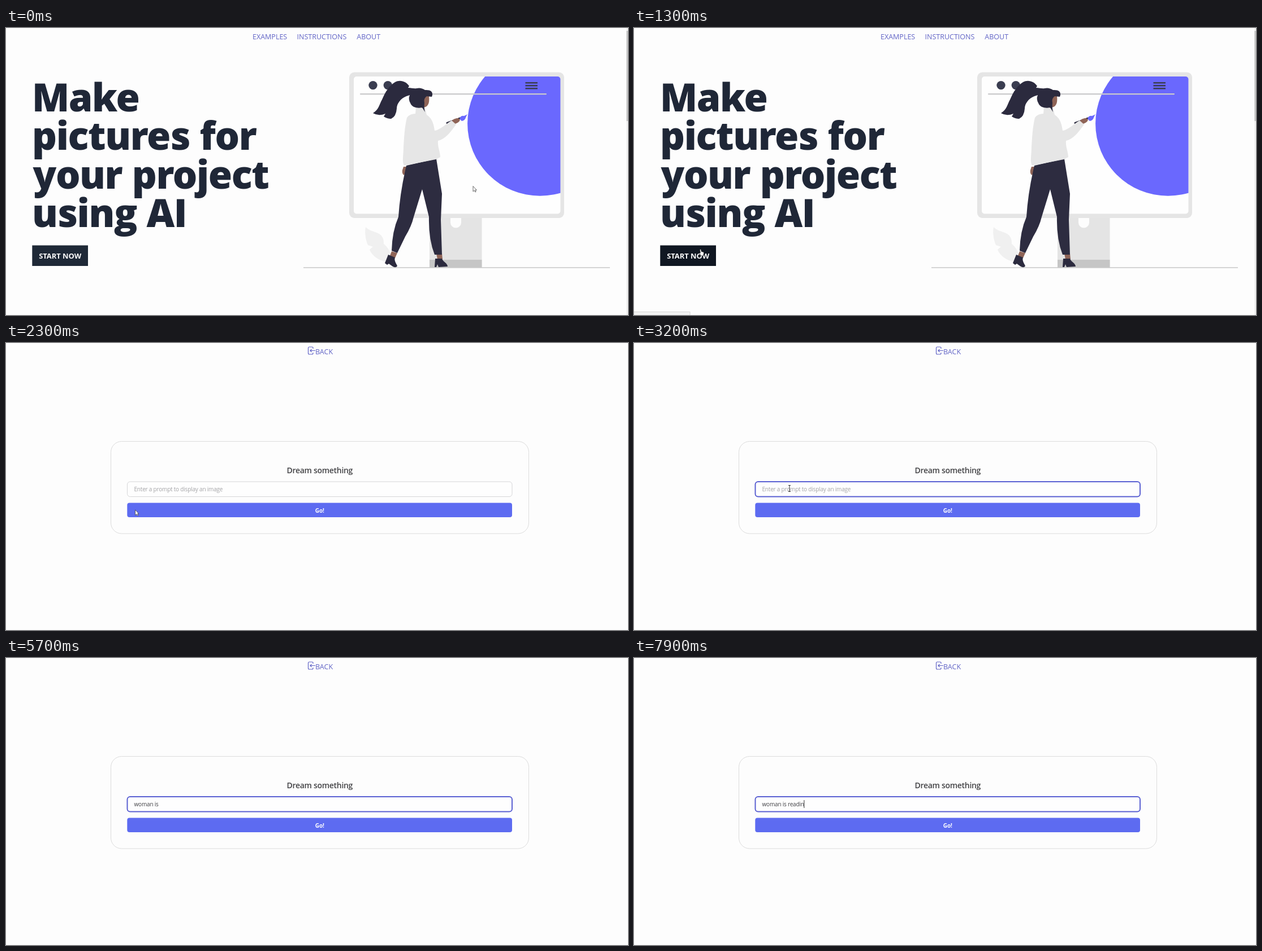
Write an HTML page that moves like this. It is 1100x509 px and loops after 8000 ms.

```html
<!DOCTYPE html>
<html lang="en">
<head>
<meta charset="utf-8">
<title>Picture maker</title>
<style>
html, body { margin: 0; width: 100%; height: 100%; overflow: hidden; background: #fdfdfd; }
svg { display: block; width: 1100px; height: 509px; }
text { font-family: "Open Sans", "Noto Sans", sans-serif; white-space: pre; }
.title { font-size: 68.5px; font-weight: 800; letter-spacing: -1.4px; word-spacing: 1px; fill: #1f2737; }
.nav { font-size: 12.5px; fill: #6164c6; }
.start { font-size: 12.9px; font-weight: 700; fill: #fbfbfb; }
.ask { font-size: 14px; font-weight: 600; letter-spacing: -.3px; fill: #434346; }
.field { font-size: 10px; letter-spacing: -.2px; }
.go { font-size: 10px; font-weight: 700; fill: #fff; }
.status { font-size: 7.5px; fill: #555; }
.mid { text-anchor: middle; }
.dark { fill: #2d2c40; }
.hair { fill: #2b2a3e; }
.skin { fill: #8f6457; }
.blue { fill: #6a68fe; }
</style>
</head>
<body>
<svg viewBox="0 0 1100 509">
  <defs>
    <clipPath id="screen"><rect x="615" y="86" width="365.5" height="243" rx="5"/></clipPath>
  </defs>
  <rect width="1100" height="509" fill="#fdfdfd"/>

  <g id="home">
    <g class="nav">
      <text x="436" y="20">EXAMPLES</text>
      <text x="514.5" y="20">INSTRUCTIONS</text>
      <text x="620.3" y="20">ABOUT</text>
    </g>
    <g class="title">
      <text x="46" y="148">Make</text>
      <text x="46" y="216.3">pictures for</text>
      <text x="47.5" y="284.6">your project</text>
      <text x="46" y="353">using AI</text>
    </g>
    <rect id="start" x="46.3" y="385.5" width="98.7" height="36.5"/>
    <text class="start mid" x="95.7" y="409.3">START NOW</text>

    <!-- leaf, monitor and stand -->
    <path fill="#f0f0f0" d="M636 353C641 359 652 361 660 365Q669 371 668 383Q678 390 684 410L674 415C660 413 647 404 643 393L649 388L640 385C636 376 634 363 636 353Z"/>
    <rect x="749" y="335" width="92.5" height="90" fill="#e4e4e4"/>
    <rect x="749" y="411" width="92.5" height="14" fill="#c6c6c6"/>
    <path fill="#fdfdfd" d="M786 337H805V345A9.5 9.5 0 0 1 786 345Z"/>
    <rect x="607" y="78.5" width="380" height="258.5" rx="9" fill="#e5e5e5"/>
    <rect x="615" y="86" width="365.5" height="243.5" rx="5" fill="#fefefe"/>
    <circle class="blue" cx="944.3" cy="169.6" r="128.2" clip-path="url(#screen)"/>
    <rect x="626" y="116" width="330" height="2.3" rx="1" fill="#c9c9cb"/>
    <g fill="#3a3d50">
      <circle cx="649" cy="101.6" r="7.7"/>
      <circle cx="675.3" cy="101.6" r="7.7"/>
      <path d="M918.5 96h21.5v2.6h-21.5zM918.5 101h21.5v2.6h-21.5zM918.5 106h21.5v2.6h-21.5z"/>
    </g>
    <path d="M526 425H1068" stroke="#c8c8c8" stroke-width="1.6"/>

    <!-- painter -->
    <path class="skin" d="M703 246L709 246Q707 256 704 261Q700 259 701 252ZM682 396L692 399L688 408L679 404ZM761 400H771L772 410H763Z"/>
    <path class="hair" d="M676 402L688 407C686 413 690 417 692 422Q690 426 684 423L677 418L674 420L670 417ZM759 409H771C773 415 781 417 781 423L765 424L763 419L761 424H758Z"/>
    <path class="dark" d="M708 244L761 232L771 294L769 340L771 402L758 402Q747 374 748 335L736 286L721 335Q717 352 706 370L692 399L682 395Q683 360 694 335Q697 290 708 244Z"/>
    <path d="M780 168.5L803 160" stroke="#2a293d" stroke-width="3" stroke-linecap="round"/>
    <path class="blue" d="M802 161Q804 155 810 156L816.5 153C812 157 814 164 806 165Z"/>
    <path class="skin" d="M787 166Q793 159 800 160L803 163Q801 169 790 171Z"/>
    <path fill="#e6e6e6" d="M725 142L741 142L744 154C752 159 756 167 758 182C767 181 777 171 788 164L796 171C787 184 777 197 764 200C763 211 768 220 768 229L760 233L704 244C700 237 703 225 703 212C704 195 705 175 709 159Q714 152 724 152Z"/>
    <path class="skin" d="M736 121H748C749 130 748 137 742 140L735 142Z"/>
    <path class="hair" d="M711 106C717 106 722 108 726 107Q734 105 741 110Q755 109 754 119L753 122L744 121Q738 125 740 133Q739 142 741 149L736 141C728 143 718 141 715 133Q711 126 714 119L708 121C698 125 691 134 691 143Q690 157 681 161Q674 161 668 157L671 152Q659 157 649 151C659 145 660 136 665 127C671 113 678 102 688 96C697 91 708 95 713 103Z"/>

    <rect x="1097" width="3" height="509" fill="#f1f1f1"/>
    <rect x="1097.3" y="5" width="2.7" height="160" fill="#c5c5c5"/>
  </g>

  <g id="form">
    <path fill="none" stroke="#6164c6" stroke-width="1.2" d="M543 10V9Q543 7 541 7H536.5Q534.5 7 534.5 9V18Q534.5 20 536.5 20H541Q543 20 543 18V17M547 13.5H538M540.5 11L538 13.5L540.5 16"/>
    <text class="nav" x="547" y="20">BACK</text>
    <rect x="185.5" y="174.5" width="739" height="163.5" rx="19" fill="#fdfdfd" stroke="#dcdcdc"/>
    <text class="ask mid" x="554.8" y="230.5">Dream something</text>
    <rect id="box" x="214.5" y="246" width="680.5" height="26.5" rx="5" fill="#fefefe"/>
    <text id="hint" class="field" x="226.5" y="263" fill="#a3a3a6">Enter a prompt to display an image</text>
    <text id="typed" class="field" x="226.5" y="263" fill="#3f3f44"></text>
    <rect id="caret" y="252" width="1" height="14" fill="#333"/>
    <rect x="214.3" y="283.5" width="680.7" height="25.5" rx="4" fill="#5d6bf1"/>
    <text class="go mid" x="554.8" y="300.5">Go!</text>
  </g>

  <g id="status">
    <rect id="bar" x="-1" y="503.5" height="8" fill="#f3f3f3" stroke="#d4d4d4"/>
    <text id="note" class="status" x="3" y="513.5"></text>
  </g>

  <g id="pointer">
    <path id="arrow" fill="#fff" stroke="#444" stroke-width=".8" d="M0 .5V10L2.3 8.1L3.9 11L5.2 10.3L3.9 7.4H6.3Z"/>
    <path id="hand" fill="#fff" stroke="#222" stroke-width=".7" d="M.5 1.2Q1.6 -.4 2.6 1.2L3.2 4.5L7.2 5.4Q8 7 7 9.5L6.6 12H2.6L-.4 7.4Q-.2 6.3 1.4 7.3Z"/>
    <path id="beam" fill="none" stroke="#333" d="M-2 -5.5H2M0 -5.5V5.5M-2 5.5H2"/>
  </g>
</svg>

<script>
const LOOP = 8000, TICK = 100, SWITCH = 1400;
const PROMPT = "woman is readin";
const keyTimes = [3400, 3600, 3700, 3900, 4100, 4400, 5200, 5300, 5900, 6100, 6400, 6800, 7100, 7300, 7800];
const caretOff = [[0, 3400], [4600, 5200], [5700, 5900], [6600, 6800], [7600, 7800]];
const path = [ // time, x, y
  [0, 826, 280], [500, 180, 377], [900, 116, 392], [1300, 116, 392],
  [1400, 116, 391], [1900, 116, 391], [2500, 268, 262], [2900, 272, 260], [3200, 275, 258]
];

const el = id => document.getElementById(id);
const show = (id, on) => { el(id).style.display = on ? "" : "none"; };
const within = (t, a, b) => t >= a && t < b;

function pointerAt(t) {
  const i = path.findIndex(p => p[0] > t);
  if (i < 0) return path[path.length - 1].slice(1);
  const [t0, x0, y0] = path[i - 1], [t1, x1, y1] = path[i];
  const u = (t - t0) / (t1 - t0), k = u * u * (3 - 2 * u);
  return [x0 + (x1 - x0) * k, y0 + (y1 - y0) * k];
}

function drawPointer(t) {
  const [x, y] = pointerAt(t);
  const hover = t < SWITCH && x < 145 && y > 386;
  const beam = t >= SWITCH && y < 272;
  show("pointer", t < 3400);
  show("hand", hover);
  show("beam", beam);
  show("arrow", !hover && !beam);
  el("pointer").setAttribute("transform", `translate(${x} ${y})`);
  el("start").setAttribute("fill", hover ? "#101722" : "#1f2937");
}

function drawForm(t) {
  const focus = t >= 2600, typed = el("typed");
  const box = el("box");
  box.setAttribute("stroke", focus ? "#5a60d2" : "#d6d6d8");
  box.setAttribute("stroke-width", focus ? 2 : 1);
  typed.textContent = PROMPT.slice(0, keyTimes.filter(k => k <= t).length);
  show("hint", !typed.textContent);
  show("caret", !caretOff.some(([a, b]) => within(t, a, b)));
  if (typed.textContent) el("caret").setAttribute("x", 226.2 + typed.getComputedTextLength());
}

function drawStatus(t) {
  const waiting = t >= SWITCH;
  show("status", within(t, 1200, 1900));
  el("bar").setAttribute("width", waiting ? 191 : 100);
  el("note").textContent = waiting ? "Getting the page ready, hold on a moment" : "open the picture form";
}

function draw() {
  const t = Math.floor(performance.now() % LOOP / TICK) * TICK;
  show("home", t < SWITCH);
  show("form", t >= SWITCH);
  drawPointer(t);
  drawStatus(t);
  if (t >= SWITCH) drawForm(t);
  requestAnimationFrame(draw);
}
draw();
</script>
</body>
</html>
```
